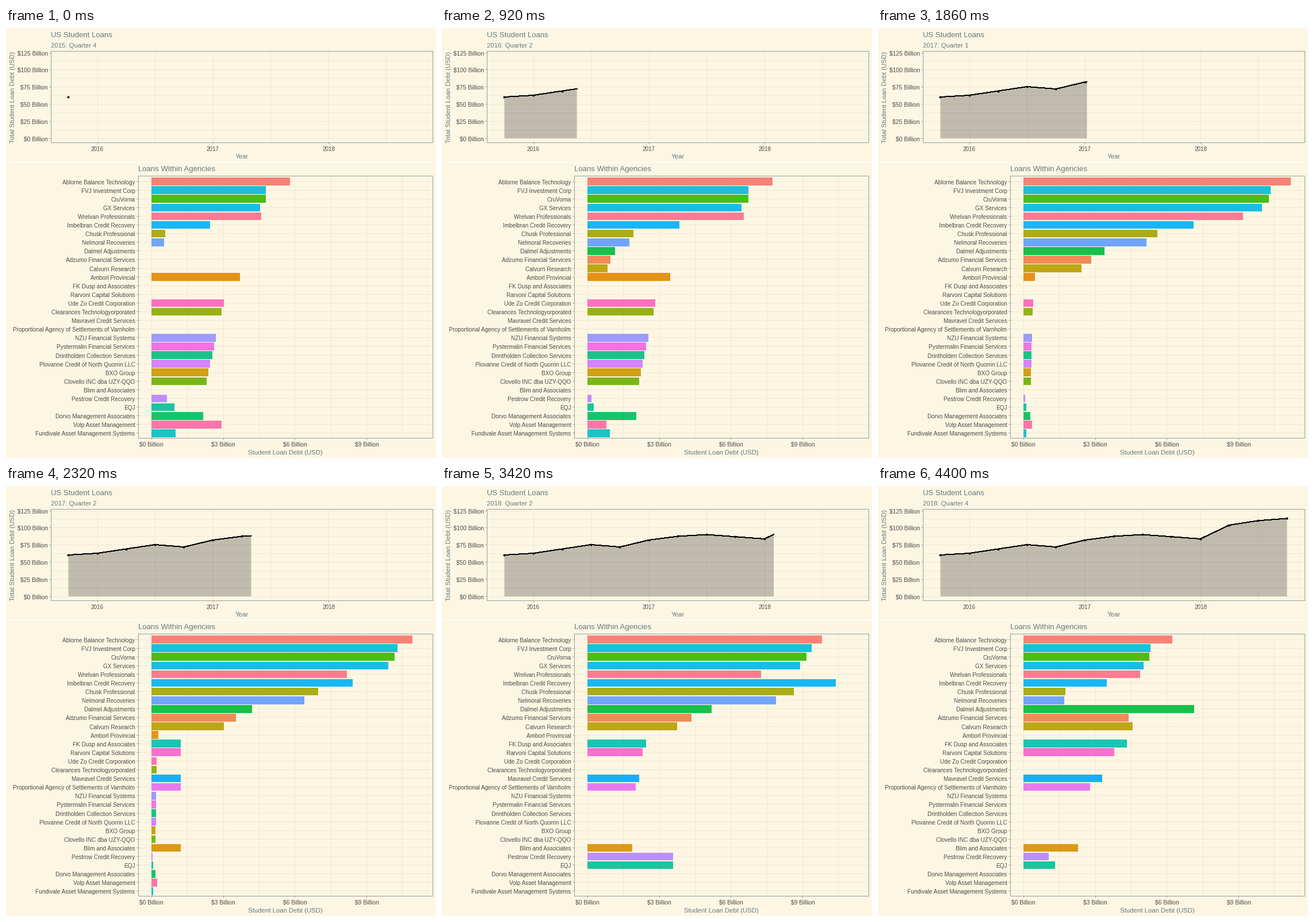
These frames come from a looping animation (748x748 px, 4420 ms). A matplotlib script:

```python
import numpy as np
import matplotlib.pyplot as plt
from matplotlib.animation import FuncAnimation
from matplotlib.patches import Polygon, Rectangle

SIZE, DPI = 748, 100
FRAMES, INTERVAL = 221, 20
HOLD, STEP = 9, 17            # frames a quarter rests, frames per quarter
PAPER, GRID, EDGE = "#fdf6e3", "#eee8d5", "#93a1a1"
TITLE, LABEL = "#657b83", "#4d4d4d"

AGENCIES = [
    "Ablorne Balance Technology", "FVJ Investment Corp", "CruVorna",
    "GX Services", "Wrelvan Professionals", "Imbelbran Credit Recovery",
    "Chusk Professional", "Nelmoral Recoveries", "Dalmel Adjustments",
    "Adzumo Financial Services", "Calvurn Research", "Amborl Provincial",
    "FK Dusp and Associates", "Rarvoni Capital Solutions",
    "Ude Zo Credit Corporation", "Clearances Technologyorporated",
    "Mavravel Credit Services",
    "Proportional Agency of Settlements of Varnholm",
    "NZU Financial Systems", "Pystermalin Financial Services",
    "Drintholden Collection Services", "Plovanne Credit of North Quorrin LLC",
    "BXO Group", "Clovello INC dba UZY-QQO", "Blim and Associates",
    "Pestrow Credit Recovery", "EQJ", "Dorvo Management Associates",
    "Volp Asset Management", "Fundivale Asset Management Systems",
]
COUNT = len(AGENCIES)
QUARTERS = np.arange(13)


def curve(*points):
    """Piecewise line through (quarter, value) points, at every quarter."""
    return np.interp(QUARTERS, *zip(*points))


def bar_lengths():
    """Bar lengths in pixels by quarter and agency; zero means no bar."""
    out = np.zeros((13, COUNT))

    # Leaders: one climbs and eases off, the rest trail it
    lead = curve((0, 241), (2, 318), (3, 330), (4, 406), (5, 465), (6, 465),
                 (8, 430), (12, 385))
    trail = lead - curve((4, 42), (6.6, 25), (12, 13))
    out[:, 0], out[:, 1] = lead, trail
    out[:, 2] = trail - 1.3 * np.maximum(0, QUARTERS - 3)
    out[:, 3] = trail - 10 - QUARTERS
    out[:, 4] = trail - curve((4, 8), (6, 88))

    # Challengers: shares of one rising curve, the last three start late
    rise = curve((0, 102.5), (2, 138), (4, 254), (6, 338), (7, 357), (8, 351),
                 (9, 334), (10, 432), (12, 446))
    out[:, 5] = rise
    shares = [(0.83, 0.94), (0.76, 0.93), (0.5, 0.665), (0.42, 0.41), (0.36, 0.425)]
    for row, (mid, end) in enumerate(shares, 6):
        out[:, row] = rise * curve((0, 0.28 * mid), (2.4, 0.57 * mid),
                                   (4, 0.9 * mid), (6, mid), (10, mid), (12, end))
    out[:2, 8:11] = 0

    # Outgoing agencies: collapse after a year, gone by the seventh quarter
    fade = curve((0, 1), (2, 0.94), (3, 0.94), (4, 0.19), (6, 0.075), (7, 0))
    quick = curve((0, 1), (2, 0.28), (3, 0.26), (4, 0.17), (6, 0.08), (7, 0))
    out[:, 11] = 153.5 * fade
    for row in [14, 15, *range(18, 24)]:
        out[:, row] = (125.5 - 3.3 * (row - 14)) * fade
    for row, start, drop in [(25, 27, quick), (26, 39.5, quick), (27, 90.5, fade),
                             (28, 121.5, quick), (29, 41.5, fade)]:
        out[:, row] = start * drop

    # Newcomers: start level, then spread apart
    fresh = curve((6, 40), (7, 58), (8, 58), (9, 56), (10, 102), (12, 179.5))
    for k, row in enumerate([12, 13, 16, 17, 24]):
        out[6:, row] = (fresh * curve((8, 1), (12, 1 - 0.118 * k)))[6:]

    # Two that come back
    out[9:, 25:27] = curve((9, 40), (10, 149), (12, 165))[9:, None]
    return out


def hcl(hue, chroma=100, light=65):
    """Polar LUV colour as sRGB."""
    a = np.radians(hue)
    y = ((light + 16) / 116) ** 3
    u = chroma * np.cos(a) / (13 * light) + 0.19784
    v = chroma * np.sin(a) / (13 * light) + 0.46834
    x = 9 * y * u / (4 * v)
    z = -x / 3 - 5 * y + 3 * y / v
    rgb = np.array([3.2405 * x - 1.5371 * y - 0.4985 * z,
                    -0.9693 * x + 1.8760 * y + 0.0416 * z,
                    0.0556 * x - 0.2040 * y + 1.0572 * z])
    rgb = np.clip(rgb, 0, 1)
    return np.where(rgb > 0.00304, 1.055 * rgb ** (1 / 2.4) - 0.055, 12.92 * rgb)


def pt(px):
    return px * 72 / DPI


plt.rcParams["font.family"] = "Liberation Sans"
fig = plt.figure(figsize=(SIZE / DPI, SIZE / DPI), dpi=DPI, facecolor=PAPER)
ax = fig.add_axes([0, 0, 1, 1])
ax.axis("off")


def write(x, y, text, px, color=LABEL, ha="left", **kw):
    return ax.text(x, y, text, fontsize=pt(px), color=color, ha=ha,
                   va="baseline", **kw)


def panel(left, top, right, bottom, xs, ys, xticks, yticks):
    """Grid, ticks and border, each line centred on a pixel."""
    def lines(draw_lines, at, start, end, color):
        draw_lines(np.floor(at) + 0.5, start, end, color=color, lw=pt(1),
                   zorder=1, snap=False)

    lines(ax.vlines, xs, top, bottom, GRID)
    lines(ax.hlines, ys, left, right, GRID)
    lines(ax.vlines, xticks, bottom, bottom + 3, EDGE)
    lines(ax.hlines, yticks, left - 3, left, EDGE)
    ax.add_patch(Rectangle((left, top), right - left, bottom - top, fill=False,
                           ec=EDGE, lw=pt(1), zorder=6, snap=False))


# Total debt over time
ZERO_Y, PER_BILLION = 192.0, 1.192
years = 159 + 201 * np.arange(3)
levels = ZERO_Y - 25 * PER_BILLION * np.arange(6)
panel(78.5, 40.5, 742.5, 199.5,
      np.concatenate([years, years + 100.5]),
      np.concatenate([levels, levels[:5] - 12.5 * PER_BILLION]), years, levels)
for i in range(6):
    write(73, levels[i] + 4.6, f"${25 * i} Billion", 10.2, ha="right")
for i in range(3):
    write(years[i], 213.5, str(2016 + i), 9.9, ha="center")
write(78.5, 16, "US Student Loans", 13.1, TITLE)
subtitle = write(78.5, 33.7, "", 11.3, TITLE)
write(410, 227.3, "Year", 11.4, TITLE, "center")
write(15.5, 120, "Total Student Loan Debt (USD)", 11.5, TITLE, "center",
      rotation=90, rotation_mode="anchor")

totals = curve((0, 60.4), (1, 62.9), (3, 75.5), (4, 72.1), (5, 82.2), (6, 87.7),
               (7, 90.2), (9, 83.9), (10, 104), (11, 110.5), (12, 113.7))
dot_x = 108.5 + 50.25 * QUARTERS
dot_y = ZERO_Y - PER_BILLION * totals
area = ax.add_patch(Polygon([(0, 0)] * 3, fc="#333333", alpha=0.3, lw=0, zorder=3))
trend, = ax.plot([], [], color="black", lw=pt(1), zorder=4, antialiased=False)
dots, = ax.plot([], [], "o", color="black", ms=pt(3.9), mew=0, zorder=5, snap=False)

ax.hlines(233.5, 0, SIZE, color="white", lw=pt(1), snap=False)

# Loans by agency
ZERO_X = 253
rows = 267 + 15.1 * np.arange(COUNT)
marks = ZERO_X + 0.3 + 124.7 * np.arange(4)
panel(230.5, 257.5, 742.5, 713.5,
      np.concatenate([marks, marks + 62.3]), rows, marks, rows)
for y, name in zip(rows, AGENCIES):
    write(224.5, y + 4.5, name, 9.95, ha="right")
for i in range(4):
    write(marks[i], 727.7, f"${3 * i} Billion", 10.2, ha="center")
write(230.5, 249.3, "Loans Within Agencies", 13.2, TITLE)
write(486, 741.5, "Student Loan Debt (USD)", 11.4, TITLE, "center")

# Hues run around the wheel in alphabetical order
ranked = sorted(AGENCIES, key=str.lower)
colors = [hcl(15 + 360 / COUNT * ranked.index(name)) for name in AGENCIES]
tops, bottoms = np.round(rows - 6.8), np.round(rows + 6.8)
bars = ax.barh(tops, np.zeros(COUNT), height=bottoms - tops, left=ZERO_X,
               align="edge", alpha=0.9, color=colors, lw=0, zorder=3)
ax.set_xlim(0, SIZE)
ax.set_ylim(SIZE, 0)

lengths = bar_lengths()


def draw(frame):
    quarter, offset = divmod(frame, STEP)
    n = quarter + 3
    subtitle.set_text(f"{2015 + n // 4}: Quarter {n % 4 + 1}")

    # Bars missing from either quarter switch only when the next one begins
    now, after = lengths[quarter], lengths[(quarter + 1) % 13]
    mix = max(0, offset - HOLD) / (STEP - HOLD)
    shown = np.where((now > 0) & (after > 0), now + mix * (after - now), now)
    for bar, width in zip(bars, np.round(shown)):
        bar.set_width(width)

    head = dot_x[0] + (dot_x[-1] - dot_x[0]) * frame / (FRAMES - 1)
    past = dot_x <= head + 1e-6
    xs = np.append(dot_x[past], head)
    ys = np.append(dot_y[past], np.interp(head, dot_x, dot_y))
    trend.set_data(xs, ys)
    dots.set_data(dot_x[past], dot_y[past])
    area.set_xy([(xs[0], ZERO_Y), *zip(xs, ys), (head, ZERO_Y)])
    return [subtitle, trend, dots, area, *bars]


anim = FuncAnimation(fig, draw, frames=FRAMES, interval=INTERVAL,
                     repeat=True, repeat_delay=0)
plt.show()
```
